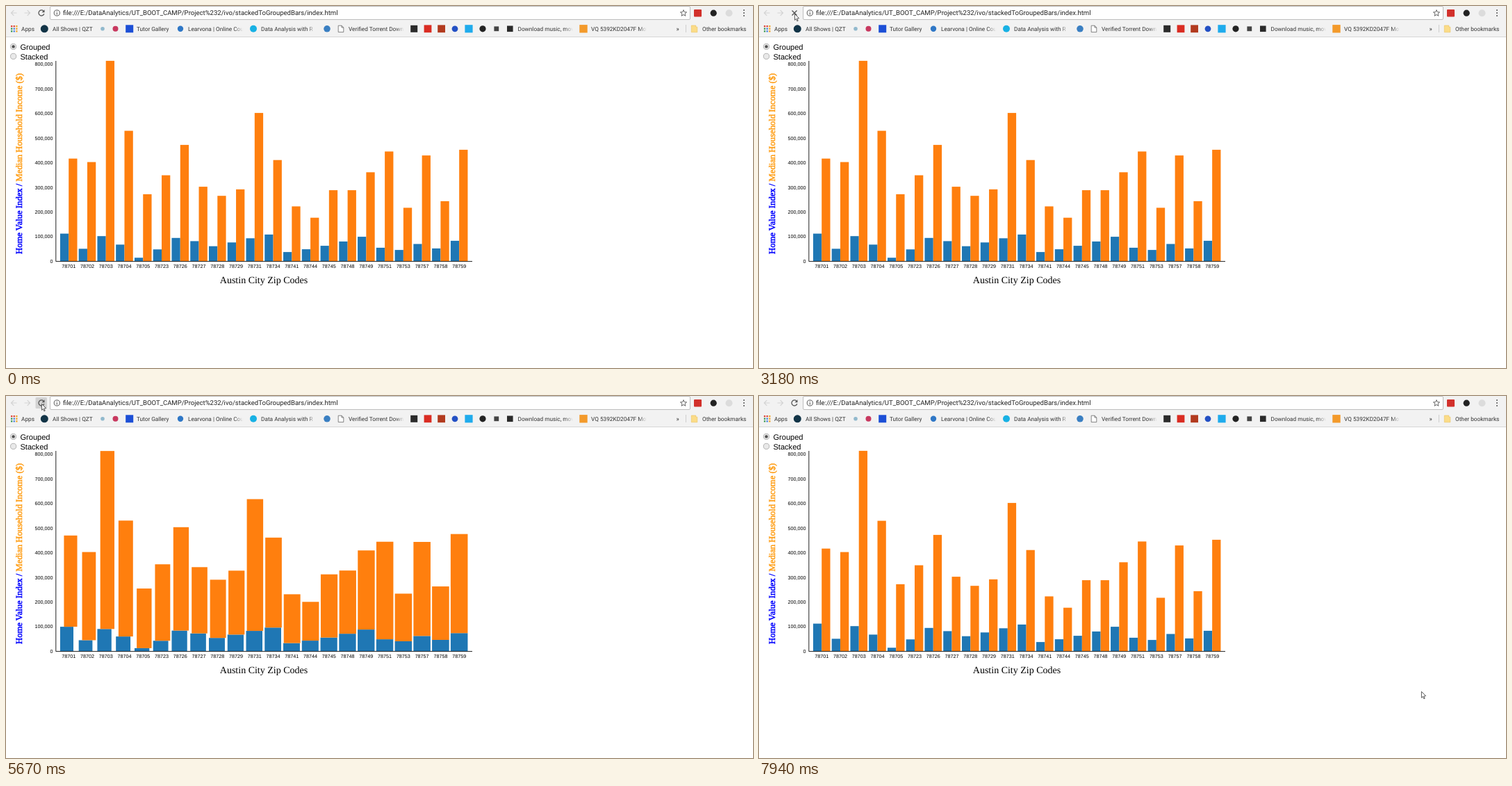
Animation of 1075x521 px, one loop 8 s. Source, as an HTML page:

```html
<!DOCTYPE html>
<html lang="en">
<head>
<meta charset="utf-8">
<title>Stacked to grouped bars</title>
<style>
  html, body { margin: 0; width: 100%; height: 100%; overflow: hidden; background: #fff; }
  svg { display: block; width: 100%; height: 100%; text-rendering: geometricPrecision; }
  .ui { font-family: Roboto, "Open Sans", sans-serif; font-size: 8.25px; fill: #333; }
  .url { font-size: 9.54px; fill: #222; }
  .radio { font: 11.05px "Liberation Sans", Arial, sans-serif; }
  .axis { font: 7.2px "Liberation Sans", Arial, sans-serif; }
  .title { font: 14px "Liberation Serif", "Times New Roman", serif; }
  .side { font: 12.66px "Liberation Serif", "Times New Roman", serif; stroke-width: .5; }
</style>
</head>
<body>
<svg id="stage" viewBox="0 0 1075 521">
  <defs>
    <linearGradient id="fade">
      <stop offset="0" stop-color="#f2f2f2" stop-opacity="0"/>
      <stop offset="1" stop-color="#f2f2f2"/>
    </linearGradient>
  </defs>
  <rect width="1075" height="521" fill="#fff"/>
  <g id="page">
    <g id="radios"></g>
    <g id="chart">
      <g id="bars"></g>
      <g id="axes" class="axis"></g>
      <path d="M71.8 79V367.6H671" fill="none" stroke="#222" stroke-width="1"/>
      <text class="title" x="371" y="399" text-anchor="middle">Austin City Zip Codes</text>
      <text class="side" transform="translate(23 357) rotate(-90)"><tspan fill="#00f" stroke="#00f">Home Value Index / </tspan><tspan fill="#ff9d14" stroke="#ff9d14">Median Household Income ($)</tspan></text>
    </g>
  </g>
  <g id="browser" class="ui">
    <rect width="1075" height="45" fill="#f2f2f2"/>
    <path d="M0 44.5H1075" stroke="#d6d6d6"/>
    <rect x="63.5" y=".5" width="921" height="19" rx="1.5" fill="#fff" stroke="#bdbdbd"/>
    <g fill="none" stroke="#d3d3d3" stroke-width="1.2">
      <path d="M15.5 10H7.5M11.3 6.2 7.5 10l3.8 3.8"/>
      <path d="M26.5 10h8M30.7 6.2 34.5 10l-3.8 3.8"/>
    </g>
    <rect id="hover" x="42.5" y="2" width="16.5" height="16" rx="1.5" fill="#d2d2d2"/>
    <g id="reload">
      <path d="M53.9 7.2A4 4 0 1 0 54.8 11.2" fill="none" stroke="#555" stroke-width="1.3"/>
      <path d="M55.5 5.3V9.3H51.5Z" fill="#555"/>
    </g>
    <path id="stop" d="M47.5 6.5l7 7M54.5 6.5l-7 7" stroke="#555" stroke-width="1.4"/>
    <circle cx="73.3" cy="10" r="4.1" fill="none" stroke="#555"/>
    <path d="M73.3 9.4V12.4M73.3 7.4v1.1" stroke="#555" stroke-width="1.1"/>
    <text class="url" x="82" y="13.3">file:///E:/DataAnalytics/UT_BOOT_CAMP/Project%232/ivo/stackedToGroupedBars/index.html</text>
    <path id="star" fill="none" stroke="#555" stroke-width=".9"/>
    <rect x="990" y="5" width="11" height="10.5" rx="1" fill="#d2302b"/>
    <circle cx="1018.2" cy="10.2" r="4.6" fill="#222"/>
    <circle cx="1040.5" cy="10.2" r="5" fill="#dcdcdc"/>
    <g fill="#555"><circle cx="1062" cy="6" r="1"/><circle cx="1062" cy="10" r="1"/><circle cx="1062" cy="14" r="1"/></g>
    <g id="apps"></g>
    <g id="marks"></g>
    <path d="M478.2 28.2h4.8l2.8 2.8v6.6h-7.6ZM483 28.2V31h2.8" fill="#fff" stroke="#666" stroke-width=".8"/>
    <text x="964.5" y="35.6" font-size="9">»</text>
    <path d="M978.5 27v11" stroke="#cfcfcf"/>
    <path d="M986.3 28h6.5v2.2h2v7.6h-8.5Z" fill="#fbdc88" stroke="#e9c25c" stroke-width=".6"/>
  </g>
  <path id="cursor" d="M.4.4V9.3L2.4 7.5 3.9 10.8 5.2 10.2 3.8 7 6.6 6.7Z" fill="#fff" stroke="#333" stroke-width=".8"/>
</svg>
<script>
const LOOP = 8000, BASE = 367.6;
const PITCH = 26.76, BAND = 24.6, LEFT = 77.9;
const SQUASH = 1.127; // grouped scale over stacked scale
const COLORS = ["#1f77b4", "#ff7f0e"];
const PRESS = 2920, CLEAR = 3240, DRAW = 3400, GROW = 3417;
const REGROUP = 5430, NARROW = 5429, DROP = 5963;

const ZIPS = "01 02 03 04 05 23 26 27 28 29 31 34 41 44 45 48 49 51 53 57 58 59".split(" ");
const VALUES = [
  [40, 18.2, 36.4, 24.2, 5.3, 17.3, 33.8, 29.2, 21.9, 27.3, 33.3,
   38.7, 13.5, 17.5, 22.5, 28.7, 35.5, 19.7, 16.5, 25.1, 18.7, 29.7],
  [148, 143, 288.7, 188, 96.7, 124, 167.7, 107.5, 94.4, 103.7, 213.7,
   145.9, 79.2, 62.9, 102.5, 102.5, 128.3, 158.2, 77.2, 152.5, 86.7, 160.7]
];

// start, end, number of steps, then where the pointer arrives
const MOVES = [
  [370, 370, 1, 853, 467], [440, 510, 2, 483, 349], [840, 1070, 4, 149, 172],
  [1540, 1690, 3, 79, 81], [2020, 2150, 3, 32, 9], [2310, 2310, 1, 36, 8],
  [2400, 2620, 4, 51, 11], [7240, 7560, 5, 687, 234], [7790, 7940, 3, 953, 425]
];
const REDRAWS = [
  [2920, 3720, 11], [3820, 3870, 2], [4830, 4830, 1], [5430, 6230, 11], [6320, 6630, 5]
];

const $ = id => document.getElementById(id);
const clamp = v => Math.min(1, Math.max(0, v));
const mix = (a, b, f) => a + (b - a) * f;
const ease = v => {
  const u = clamp(v);
  return u < .5 ? 4 * u ** 3 : 1 - 4 * (1 - u) ** 3;
};
const show = (el, on) => el.setAttribute("visibility", on ? "visible" : "hidden");

function add(parent, name, attrs, text) {
  const el = document.createElementNS("http://www.w3.org/2000/svg", name);
  for (const key in attrs) el.setAttribute(key, attrs[key]);
  if (text !== undefined) el.textContent = text;
  return parent.appendChild(el);
}

const stepTimes = ([start, end, n]) =>
  Array.from({ length: n }, (_, k) => n > 1 ? start + (end - start) * k / (n - 1) : start);
const ticks = [0, ...[...MOVES, ...REDRAWS].flatMap(stepTimes)].sort((a, b) => a - b);

const pointer = [];
let from = [853, 467];
for (const move of MOVES) {
  const to = move.slice(3);
  stepTimes(move).forEach((time, k) => {
    const f = (k + 1) / move[2];
    pointer.push({ time, x: mix(from[0], to[0], f), y: mix(from[1], to[1], f) });
  });
  from = to;
}

// axis labels
for (let k = 0; k <= 8; k++)
  add($("axes"), "text", { x: 67.6, y: BASE + 2.3 - k * 35.44, "text-anchor": "end" }, k ? k + "00,000" : "0");
ZIPS.forEach((zip, i) =>
  add($("axes"), "text", { x: LEFT + BAND / 2 + i * PITCH, y: 376.7, "text-anchor": "middle" }, "787" + zip));

const bars = VALUES.map((row, s) => row.map(() => add($("bars"), "rect", { fill: COLORS[s] })));

const dots = ["Grouped", "Stacked"].map((name, k) => {
  const y = 58.4 + k * 14;
  add($("radios"), "circle", { cx: 10.6, cy: y, r: 4.1, fill: "#e9e9e9", stroke: "#a2a2a2", "stroke-width": .8 });
  add($("radios"), "text", { class: "radio", x: 20.5, y: y + 4.5 }, name);
  return add($("radios"), "circle", { cx: 10.6, cy: y, r: 2.2, fill: "#505050" });
});

// bookmark bar: x, text, right edge of the fade
const LABELS = [
  [22, "Apps"], [67, "All Shows | QZT"], [188, "Tutor Gallery"],
  [262, "Learvona | Online Cou", 341], [367, "Data Analysis with R", 445],
  [493, "Verified Torrent Down", 573], [736.5, "Download music, mov", 816],
  [842, "VQ 5392KD2047F Moto", 922], [1002, "Other bookmarks"]
];
for (const [x, text, edge] of LABELS) {
  add($("marks"), "text", { x, y: 35.6 }, text);
  if (edge) {
    add($("marks"), "rect", { x: edge - 12, y: 26, width: 12, height: 14, fill: "url(#fade)" });
    add($("marks"), "rect", { x: edge, y: 26, width: 10, height: 14, fill: "#f2f2f2" });
  }
}
// icons: centre, half size, colour
const ROUND = [
  [55.3, 5.5, "#123447"], [139, 2.8, "#91b9cd"], [157.5, 4, "#c8385f"], [251, 4.2, "#2f77c6"],
  [356, 5, "#18b1e4"], [462, 4.8, "#3a7fc2"], [646, 4.4, "#2350c4"], [686, 4.6, "#222"]
];
const SQUARE = [
  [177.7, 5.5, "#1c4fd6"], [587.2, 5, "#2b2b2b"], [607, 5.4, "#da2c22"], [626.6, 5.4, "#b23a1e"],
  [666, 5.6, "#1fabec"], [705.8, 3.4, "#444"], [725.3, 4.3, "#2a2a2a"], [831, 5.7, "#f39a2b"]
];
for (const [cx, r, fill] of ROUND) add($("marks"), "circle", { cx, cy: 32.8, r, fill });
for (const [x, h, fill] of SQUARE)
  add($("marks"), "rect", { x: x - h, y: 32.8 - h, width: 2 * h, height: 2 * h, fill });

const GRID = ["#e0483b", "#e0483b", "#f0a52a", "#3f9b57", "#4a80e0", "#f0a52a", "#3f9b57", "#4a80e0", "#f0a52a"];
GRID.forEach((fill, k) =>
  add($("apps"), "rect", { x: 7 + k % 3 * 3.6, y: 28 + Math.floor(k / 3) * 3.6, width: 2.3, height: 2.3, fill }));

$("star").setAttribute("d", "M" + Array.from({ length: 10 }, (_, k) => {
  const r = k % 2 ? 2.1 : 4.8, a = k * Math.PI / 5;
  return (975 + r * Math.sin(a)).toFixed(2) + " " + (10.4 - r * Math.cos(a)).toFixed(2);
}).join("L") + "Z");

function hoverLevel(t) {
  if (t < PRESS) return clamp((t - 2310) / 310);
  if (t < 4830) return t < 3000 ? 1 : 0;
  return 1 - clamp((t - 7170) / 310);
}

function drawBars(t) {
  const fresh = t >= CLEAR;
  for (let i = 0; i < ZIPS.length; i++) {
    const phase = (start, span) => fresh ? ease((t - start - i * 10) / span) : 1;
    const grow = phase(GROW, 250), narrow = phase(NARROW, 500);
    const drop = t >= 6630 ? 1 : phase(DROP, 500);
    bars.forEach((row, s) => {
      const value = VALUES[s][i];
      const height = mix(value / SQUASH, value, drop) * grow;
      const lift = s * mix(VALUES[0][i] / SQUASH, 0, drop) * grow;
      const bar = row[i];
      bar.setAttribute("x", LEFT + i * PITCH + s * narrow * BAND / 2);
      bar.setAttribute("width", BAND * (1 - narrow / 2));
      bar.setAttribute("y", BASE - lift - height);
      bar.setAttribute("height", height);
    });
  }
}

function render(time) {
  const t = ticks.findLast(tick => tick <= time + .01);
  const stacked = t >= CLEAR && t < REGROUP;
  show(dots[0], !stacked);
  show(dots[1], stacked);
  show($("chart"), t < CLEAR || t >= DRAW);
  drawBars(t);

  const loading = t >= 3000 && t < DRAW;
  show($("reload"), !loading);
  show($("stop"), loading);
  $("hover").setAttribute("opacity", hoverLevel(t));

  const at = pointer.findLast(p => p.time <= t);
  show($("cursor"), at);
  if (at) $("cursor").setAttribute("transform", `translate(${at.x} ${at.y})`);
}

const begin = performance.now();
function loop() {
  render((performance.now() - begin) % LOOP);
  requestAnimationFrame(loop);
}
loop();
</script>
</body>
</html>
```
